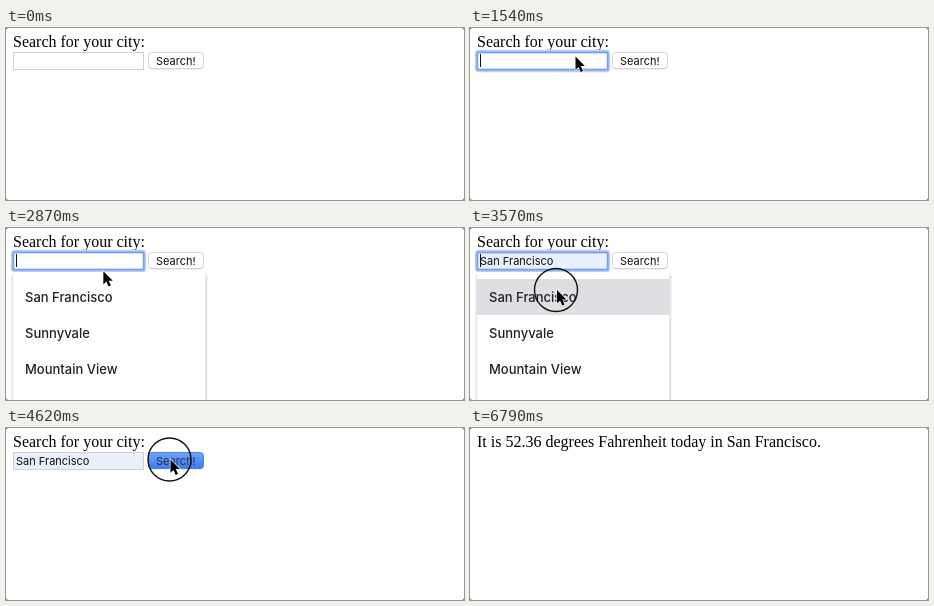
Animation of 458 by 172 pixels, one loop 7560 ms. Source, as an HTML page:

```html
<!DOCTYPE html>
<html lang="en">
<head>
<meta charset="utf-8">
<style>
  html, body { margin: 0; width: 100%; height: 100%; overflow: hidden; background: #555; }
  svg { display: block; width: 458px; height: 172px; }
  .serif { font: 16px "Liberation Serif", serif; }
  .ui { font: 11px Inter, sans-serif; fill: #111; }
  .item { font: 500 13px Inter, sans-serif; fill: #222; }
</style>
</head>
<body>
<svg viewBox="0 0 458 172">
  <defs>
    <linearGradient id="blue" x2="0" y2="1">
      <stop stop-color="#6ea6fa"/><stop offset="1" stop-color="#3c78f2"/>
    </linearGradient>
    <filter id="soft" x="-20%" y="-20%" width="140%" height="140%">
      <feGaussianBlur stdDeviation="1.5"/>
    </filter>
  </defs>
  <rect width="458" height="172" rx="2.5" fill="#fff"/>

  <g id="form">
    <text class="serif" x="7" y="19">Search for your city:</text>
    <rect id="field" x="7.5" y="24.5" width="130" height="17" stroke="#d0d0d0"/>
    <g id="ring" fill="none">
      <rect x="6.5" y="23.5" width="132" height="19" rx="2" stroke="#b9d0fa" stroke-width="3.4"/>
      <rect x="7.3" y="24.3" width="130.4" height="17.4" rx="1" stroke="#78a0ea" stroke-width="1.8"/>
    </g>
    <text id="value" class="ui" x="10" y="37">San Francisco</text>
    <rect id="caret" y="26" width="1" height="13" fill="#111"/>
    <rect x="142.5" y="25.4" width="55" height="16" rx="3.5" fill="#ddd"/>
    <rect id="button" x="142.5" y="24.5" width="55" height="16" rx="3.5" stroke="#d6d6d6"/>
    <text id="label" class="ui" x="150" y="37">Search!</text>
  </g>

  <g id="list">
    <rect x="7" y="46" width="193" height="140" rx="3" fill="#000" opacity=".3" filter="url(#soft)"/>
    <rect x="7" y="44" width="192.5" height="140" rx="3" fill="#fff"/>
    <rect id="hover" x="7" y="51" width="192.5" height="36" fill="#dfdfe3"/>
    <text class="item" x="19" y="74">San Francisco</text>
    <text class="item" x="19" y="110">Sunnyvale</text>
    <text class="item" x="19" y="146">Mountain View</text>
  </g>

  <text id="result" class="serif" x="7" y="19">It is 52.36 degrees Fahrenheit today in San Francisco.</text>

  <g id="pointer">
    <circle id="click" cx="-1" cy="0" r="21.5" fill="none" stroke="#111" stroke-width="1.4"/>
    <path d="M0 0V13.2L3 10.4L5.2 15.4L7.5 14.4L5.3 9.5H9.4Z" fill="#000" stroke="#fff" stroke-width="1.2" paint-order="stroke"/>
  </g>
</svg>
<script>
const LOOP = 7560, STEP = 70;
const $ = id => document.getElementById(id);
const show = (id, on) => $(id).style.display = on ? "" : "none";
const easeOut = u => 1 - (1 - u) ** 2;
const easeIn = u => u * u;
const smooth = u => u * u * (3 - 2 * u);

// Pointer moves: start, end, from, to, easing
const moves = [
  [490, 1260, [206, 174], [105.5, 28.5], easeOut],
  [1890, 2100, [105.5, 28.5], [103, 33], smooth],
  [2730, 3080, [103, 33], [87, 62], smooth],
  [3850, 4270, [87, 62], [164.5, 31.5], smooth],
  [6090, 6790, [164.5, 31.5], [208, 176], easeIn]
];
const clicks = [[1330, 1540], [2100, 2240], [3500, 3640], [4620, 4760]];

function pointerAt(t) {
  const [start, end, from, to, ease] = moves.findLast(m => t >= m[0]) || moves[0];
  const u = ease(Math.min(1, Math.max(0, (t - start) / (end - start))));
  return from.map((a, i) => a + (to[i] - a) * u);
}

function draw(t) {
  const during = (a, b) => t >= a && t < b;
  const picked = t >= 3640, filled = t >= 2940, pressed = during(4620, 4760);

  show("form", t < 5040);
  show("result", t >= 5040);
  show("ring", during(1400, 4620));
  show("value", filled);
  $("field").setAttribute("fill", filled ? "#e8f0fe" : "#fff");

  const blink = Math.floor((t - 1540) / 490) % 2 === 0;
  show("caret", picked ? t < 4130 : t >= 1400 && (t < 1540 || blink));
  $("caret").setAttribute("x", picked ? 84 : 10);

  $("button").setAttribute("fill", pressed ? "url(#blue)" : "#fff");
  $("button").setAttribute("stroke", pressed ? "#4d82e8" : "#d6d6d6");
  $("label").setAttribute("fill-opacity", pressed ? .75 : 1);

  show("list", during(2240, 3640));
  $("list").setAttribute("opacity", Math.min(1, (t - 2170) / 210));
  show("hover", filled);

  show("pointer", during(560, 6790));
  $("pointer").setAttribute("transform", `translate(${pointerAt(t)})`);
  show("click", clicks.some(c => during(...c)));
}

const begin = performance.now();
function tick() {
  const t = (performance.now() - begin) % LOOP;
  draw(Math.floor(t / STEP) * STEP);
  requestAnimationFrame(tick);
}
tick();
</script>
</body>
</html>
```
